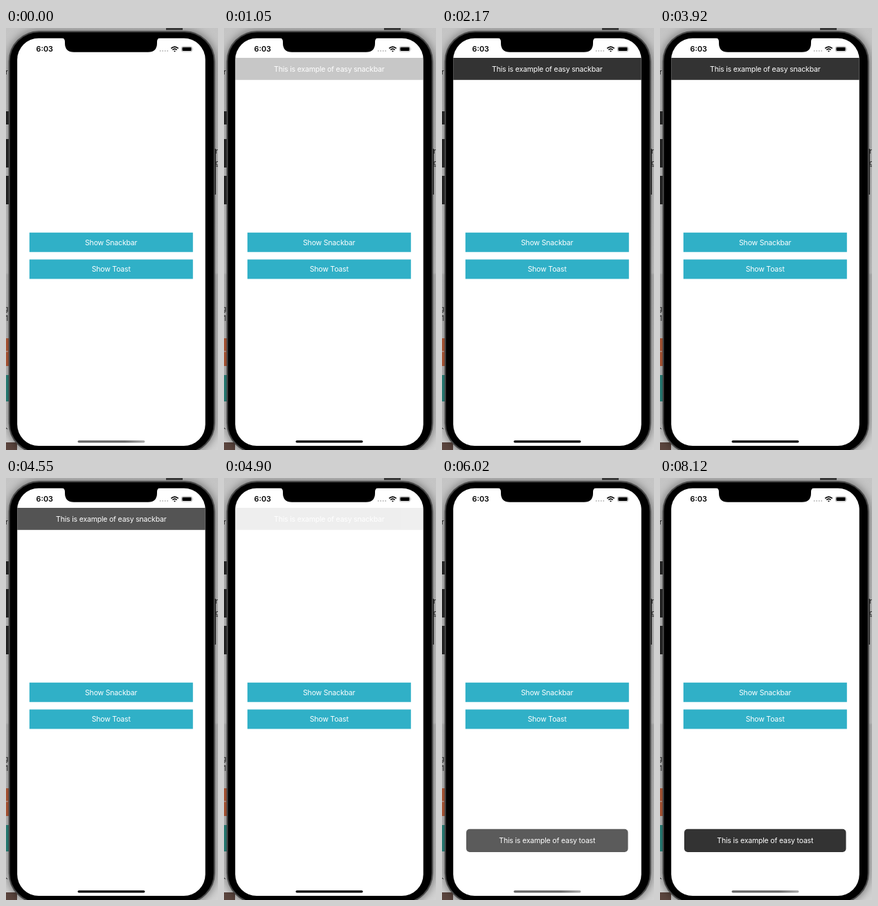
An HTML page that plays this animation: 306x608 px, repeating every 9.24 s.

```html
<!DOCTYPE html>
<html lang="en">
<head>
<meta charset="utf-8">
<title>Snackbar and toast</title>
<style>
html, body { margin: 0; width: 100%; height: 100%; overflow: hidden; background: #aaa; }
svg { display: block; width: 306px; height: 608px; }
text { font: 10.5px Inter, sans-serif; letter-spacing: -.18px; }
.label { fill: #fff; text-anchor: middle; }
.clock { font-size: 10.8px; font-weight: 600; letter-spacing: 0; }
</style>
</head>
<body>
<svg viewBox="0 0 306 608">
  <defs>
    <linearGradient id="desk" x2="0" y2="1">
      <stop offset="0" stop-color="#c4c4c4"/>
      <stop offset=".58" stop-color="#dcdcdc"/>
      <stop offset=".585" stop-color="#cacaca"/>
      <stop offset="1" stop-color="#d2d2d2"/>
    </linearGradient>
    <linearGradient id="idle">
      <stop offset="0" stop-color="#666"/>
      <stop offset=".7" stop-color="#666"/>
      <stop offset="1" stop-color="#aaa"/>
    </linearGradient>
    <filter id="soft" x="-20%" width="140%"><feGaussianBlur stdDeviation="7"/></filter>
  </defs>

  <!-- desktop behind the phone -->
  <rect width="306" height="608" fill="url(#desk)"/>
  <rect x="231" width="24" height="3" fill="#444"/>
  <path d="M0 447h4v40h-4z" fill="#c9653f"/>
  <path d="M0 500h4v38h-4z" fill="#2f938a"/>
  <path d="M0 597h16v11h-16z" fill="#5b453e"/>
  <path d="M0 466h3" stroke="#ddd"/>
  <path d="M0 576l2 2" stroke="#222"/>
  <g fill="#222">
    <text x="-1" y="67">r</text>
    <text x="-3" y="408">g</text>
    <text x="-1" y="422">1</text>
    <text x="302" y="181">r</text>
    <text x="302" y="198">g</text>
  </g>
  <rect x="4" y="5" width="298" height="608" rx="44" opacity=".55" filter="url(#soft)"/>

  <!-- phone -->
  <path d="M0 120h4v19h-4zM0 160h4v41h-4zM0 213h4v41h-4zM300 174h3v66h-3z" fill="#222"/>
  <rect x="4.7" y="5.2" width="296" height="607" rx="43" stroke="#484848" stroke-width="2"/>
  <rect x="16.2" y="14.7" width="271.5" height="587.4" rx="31" fill="#fff"/>
  <path d="M80 13.7q5 1 5 6v2q0 13 13 13h107q13 0 13-13v-2q0-5 5-6z"/>

  <!-- status bar -->
  <text class="clock" x="43.6" y="34.3">6:03</text>
  <path d="M222.7 33h12" stroke="#b5b5b5" stroke-width="1.8" stroke-linecap="round" stroke-dasharray="0 3.5"/>
  <g fill="none" stroke="#000" stroke-width="1.6">
    <path d="M238.3 29.4q5.2-4.6 10.4 0M240.3 31.5q3.2-2.8 6.4 0"/>
    <path d="M242 33.1q1.5-1.4 3 0l-1.5 1.4z" fill="#000" stroke="none"/>
  </g>
  <rect x="253.4" y="26.8" width="15.2" height="7.2" rx="2" fill="none" stroke="#aaa" stroke-width=".8"/>
  <rect x="254.4" y="27.8" width="13.2" height="5.2" rx="1.2"/>
  <path d="M269.6 29.1q1.6 1.3 0 2.6z" fill="#aaa"/>

  <!-- app -->
  <path d="M33.8 294.7h236v28h-236zM33.8 333.4h236v28h-236z" fill="#30b0c7"/>
  <text class="label" id="snackLabel" x="151.7" y="312.6">Show Snackbar</text>
  <text class="label" id="toastLabel" x="151.7" y="351.2">Show Toast</text>
  <g id="snackbar">
    <rect x="16.2" y="43" width="271.5" height="31.8" fill="#333"/>
    <text class="label" x="151.8" y="62.7">This is example of easy snackbar</text>
  </g>
  <g id="toast">
    <rect x="35" y="505.8" width="233.5" height="33.2" rx="5" fill="#333"/>
    <text class="label" x="151.8" y="526.4">This is example of easy toast</text>
  </g>
  <rect id="indicator" x="103.5" y="594.2" width="97" height="3.2" rx="1.6"/>
</svg>
<script>
const LOOP = 9240, STEP = 70;
const get = id => document.getElementById(id);
const between = (t, start, end) => t >= start && t < end;
const progress = (t, start, length) => Math.min(1, Math.max(0, (t - start) / length));
const fadeIn = (t, start, length) => progress(t, start, length) ** 2;
const fadeOut = (t, start, length) => (1 - progress(t, start, length)) ** 2;
const setOpacity = (id, value) => get(id).setAttribute('opacity', value);

function draw(now) {
  const t = Math.floor(now % LOOP / STEP) * STEP;
  setOpacity('snackbar', fadeIn(t, 761, 555) * fadeOut(t, 4502, 555));
  setOpacity('toast', fadeIn(t, 5670, 391));
  setOpacity('snackLabel', between(t, 490, 630) ? .3 : 1);
  setOpacity('toastLabel', between(t, 5250, 5320) ? .3 : 1);
  get('indicator').setAttribute('fill', between(t, 350, 5530) ? '#000' : 'url(#idle)');
}

const origin = performance.now();
function tick() {
  draw(performance.now() - origin);
  requestAnimationFrame(tick);
}
tick();
</script>
</body>
</html>
```
